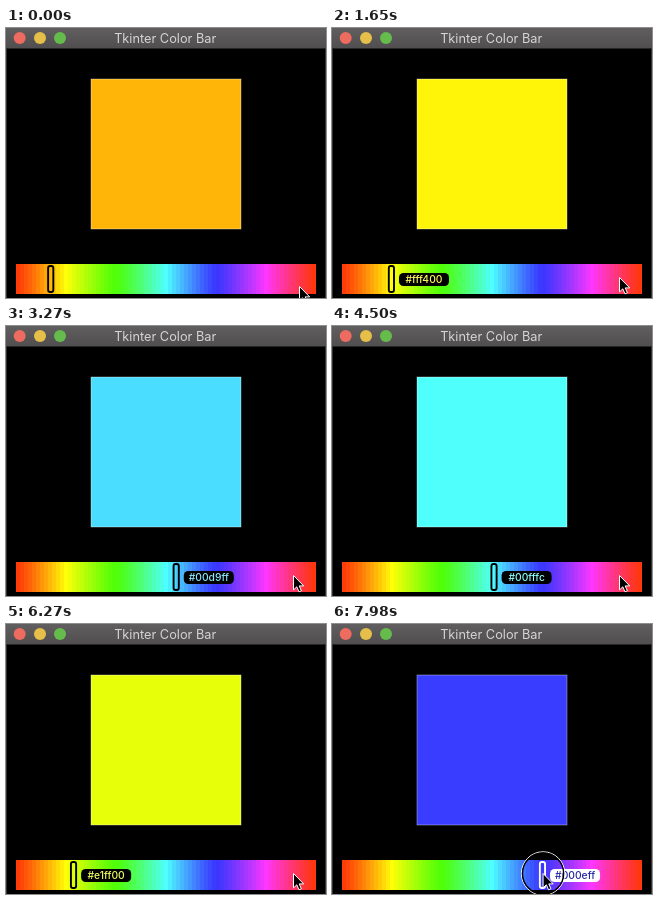
Recreate the animation shown at these times as an HTML page. Size 320 by 270 pixels, loop 8 s.

```html
<!DOCTYPE html>
<html lang="en">
<head>
<meta charset="utf-8">
<title>Tkinter Color Bar</title>
<style>
  html, body { margin: 0; width: 100%; height: 100%; overflow: hidden; background: #000; }
  svg { display: block; width: 320px; height: 270px; }
  text { font-family: Inter, Roboto, sans-serif; text-anchor: middle; }
  .title { font-size: 12.75px; fill: #d6d4d4; }
  .soft { filter: blur(0.5px); }
  #code { font-size: 10.3px; font-weight: 500; }
</style>
</head>
<body>
<svg viewBox="0 0 320 270">
  <defs>
    <linearGradient id="chrome" x2="0" y2="1">
      <stop stop-color="#605e5e"/>
      <stop offset="1" stop-color="#504e4e"/>
    </linearGradient>
  </defs>
  <rect width="320" height="270"/>
  <rect width="320" height="20.5" fill="url(#chrome)"/>
  <path d="M.5 20V270M319.5 20V270" stroke="#333"/>
  <circle cx="13.7" cy="10" r="6" fill="#ee6b60"/>
  <circle cx="34" cy="10" r="6" fill="#e6bf4a"/>
  <circle cx="54" cy="10" r="6" fill="#66bb4d"/>
  <text class="title" x="159.2" y="15">Tkinter Color Bar</text>

  <rect id="swatch" class="soft" x="85" y="51" width="150" height="150" stroke="#fff" stroke-opacity=".35"/>
  <g id="bar" class="soft"></g>
  <rect id="handle" x="-2.2" y="238" width="5.2" height="26" rx="2" fill="none" stroke-width="1.9"/>
  <g id="label">
    <rect id="plate" x="8" y="245" width="50" height="13" rx="4.5"/>
    <text id="code" x="33" y="255.3"></text>
  </g>
  <g id="cursor">
    <g id="press" fill="none">
      <circle r="21.7" stroke="#fff"/>
      <circle r="20.6" stroke="#000" stroke-width="1.4"/>
    </g>
    <path d="M0 0V14.4l3.3-3.1 2.2 5 2.4-1-2.2-4.9H10.2Z" stroke="#fff"/>
  </g>
</svg>
<script>
  const LOOP = 8000, STEP = 30;
  const SCROLL = 630, LEAVE = 6510, GRAB = 7350;

  // Turning points of the hue: [time, degrees]
  const HUE = [
    [SCROLL, 40], [1650, 57.41], [3270, 188.94], [4380, 188.94],
    [4830, 123.29], [5910, 67.06], [GRAB, 67.06], [7980, 236.71]
  ];

  const $ = id => document.getElementById(id);
  const set = (el, attrs) => {
    for (const key in attrs) el.setAttribute(key, attrs[key]);
  };
  const clamp = v => Math.min(1, Math.max(0, v));
  const lerp = (a, b, u) => a + (b - a) * u;
  const smooth = (t, from, to) => {
    const u = clamp((t - from) / (to - from));
    return u * u * (3 - 2 * u);
  };

  const slope = i => {
    const a = HUE[i], b = HUE[i + 1];
    return a && b ? (b[1] - a[1]) / (b[0] - a[0]) : 0;
  };
  const tangent = i => {
    const a = slope(i - 1), b = slope(i);
    return a * b > 0 ? 2 * a * b / (a + b) : 0;
  };

  // Monotone cubic through the turning points
  function hueAt(t) {
    const i = HUE.findLastIndex(k => k[0] <= t);
    if (i < 0) return HUE[0][1];
    if (i === HUE.length - 1) return HUE[i][1];
    const [t0, v0] = HUE[i], [t1, v1] = HUE[i + 1];
    const d = t1 - t0, u = (t - t0) / d, w = 1 - u;
    return lerp(v0, v1, smooth(u, 0, 1)) + d * u * w * (w * tangent(i) - u * tangent(i + 1));
  }

  // Full-strength colour of a hue, channels 0 to 1
  const pureColor = hue => [0, 240, 120].map(shift =>
    clamp(Math.abs((hue + shift) % 360 / 60 - 3) - 1));

  // The display lifts the dark end of each channel
  const shownColor = pure => [56 + 22 * pure[1], 54, 8].map((floor, k) =>
    lerp(floor, 255, pure[k] ** 1.15) / 255);

  const hex = rgb => '#' + rgb.map(v => Math.round(v * 255).toString(16).padStart(2, '0')).join('');

  const BAND = 4;
  for (let x = 0; x < 300; x += BAND) {
    const band = document.createElementNS('http://www.w3.org/2000/svg', 'rect');
    const fill = hex(shownColor(pureColor((x + BAND / 2) * 1.2)));
    set(band, { x: 10 + x, y: 236, width: BAND, height: 30, fill });
    $('bar').append(band);
  }

  function draw(t) {
    const hue = hueAt(t), x = 59 + (hue - 57.41) / 1.187;
    const pure = pureColor(hue), shown = shownColor(pure);
    const dark = 0.299 * pure[0] + 0.587 * pure[1] + 0.114 * pure[2] < 0.5;
    const ink = dark ? '#fff' : '#000';
    const tint = shown.map(v => lerp(v, dark ? 0 : 1, 0.35));
    const dragging = t >= GRAB;
    const labelled = t >= SCROLL && t < LEAVE || dragging;

    const away = 1 - smooth(t, 0, 480);
    const tipX = lerp(287.5 + 6 * away, x + 1, smooth(t, LEAVE, 7290));
    const tipY = 249.5 + 9 * away;

    set($('swatch'), { fill: hex(shown) });
    set($('handle'), { stroke: ink, transform: `translate(${x})` });
    set($('label'), { transform: `translate(${x})`, visibility: labelled ? 'visible' : 'hidden' });
    set($('plate'), { fill: ink });
    set($('code'), { fill: hex(tint) });
    $('code').textContent = hex(pure);
    set($('cursor'), { transform: `translate(${tipX} ${tipY})` });
    set($('press'), { visibility: dragging ? 'visible' : 'hidden' });
  }

  const start = performance.now();
  function tick() {
    const t = (performance.now() - start) % LOOP;
    draw(Math.floor(t / STEP) * STEP);
    requestAnimationFrame(tick);
  }
  tick();
</script>
</body>
</html>
```
